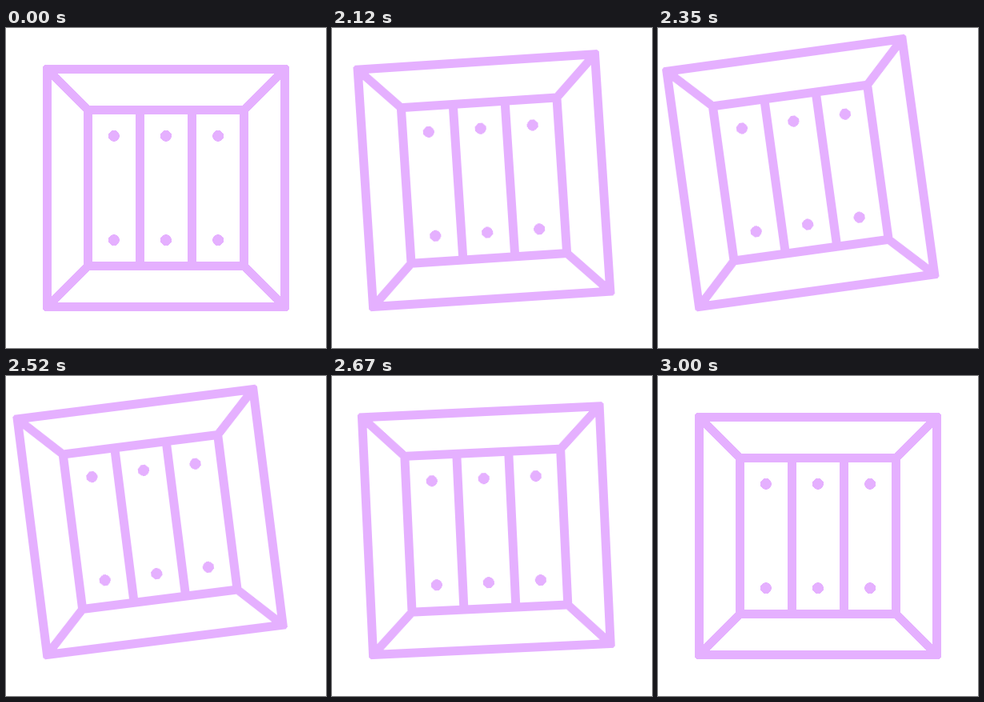
Recreate the animation shown at these times as an HTML page. Size 400 px wide and 400 px high, loop 3020 ms.

```html
<!DOCTYPE html>
<html lang="en">
<head>
<meta charset="utf-8">
<title>Tilting crate</title>
<style>
  html, body { margin: 0; width: 100%; height: 100%; overflow: hidden; background: #fff; }
  svg { display: block; width: 100vw; height: 100vh; }
  #crate {
    transform-origin: 51.1px 348.9px;
    fill: none;
    stroke: #e5b0ff;
    stroke-width: 11;
    stroke-linejoin: round;
    shape-rendering: crispEdges;
  }
  #dots { fill: #e5b0ff; stroke: none; }
</style>
</head>
<body>
<svg viewBox="0 0 400 400">
  <g id="crate">
    <path d="M51.1 51.1H348.9V348.9H51.1Z"/>
    <path d="M102.4 102.4H297.6V297.6H102.4Z"/>
    <path d="M51.1 51.1L102.4 102.4M348.9 51.1L297.6 102.4M348.9 348.9L297.6 297.6M51.1 348.9L102.4 297.6"/>
    <path d="M167.5 102.4V297.6M232.5 102.4V297.6"/>
    <g id="dots"></g>
  </g>
</svg>
<script>
  const LOOP = 3020, STEP = 25;
  const START = 2000, TOP = 2430, HIT = 2731, END = 3000;
  const TILT = 8, BOUNCE = 1.6;

  const crate = document.getElementById('crate');
  const dots = document.getElementById('dots');

  for (const y of [134.9, 265.1]) {
    for (const x of [134.9, 200, 265.1]) {
      const dot = document.createElementNS('http://www.w3.org/2000/svg', 'circle');
      dot.setAttribute('cx', x);
      dot.setAttribute('cy', y);
      dot.setAttribute('r', 7);
      dots.append(dot);
    }
  }

  // Bezier ease with flat ends; a and b are the handle positions in time.
  function ease(u, a, b) {
    let lo = 0, hi = 1;
    for (let i = 0; i < 24; i++) {
      const p = (lo + hi) / 2, q = 1 - p;
      if (3 * a * p * q * q + 3 * b * p * p * q + p * p * p < u) lo = p;
      else hi = p;
    }
    return lo * lo * (3 - 2 * lo);
  }

  // Lift on one corner, free fall, one small rebound.
  function angle(t) {
    if (t <= START || t >= END) return 0;
    if (t < TOP) return -TILT * ease((t - START) / (TOP - START), 0.3, 0.18);
    if (t < HIT) return -TILT * (1 - ((t - TOP) / (HIT - TOP)) ** 2);
    const u = (t - HIT) / (END - HIT);
    return -BOUNCE * 4 * u * (1 - u);
  }

  const pose = (time, deg) => ({
    offset: time / LOOP,
    transform: `rotate(${deg.toFixed(4)}deg)`,
    easing: 'steps(1, end)'
  });

  const frames = [pose(0, 0)];
  for (let t = START + STEP; t <= END; t += STEP) {
    frames.push(pose(Math.ceil((t - 5) / 10) * 10, angle(t)));
  }
  frames.push(pose(LOOP, 0));

  crate.animate(frames, { duration: LOOP, iterations: Infinity });
</script>
</body>
</html>
```
